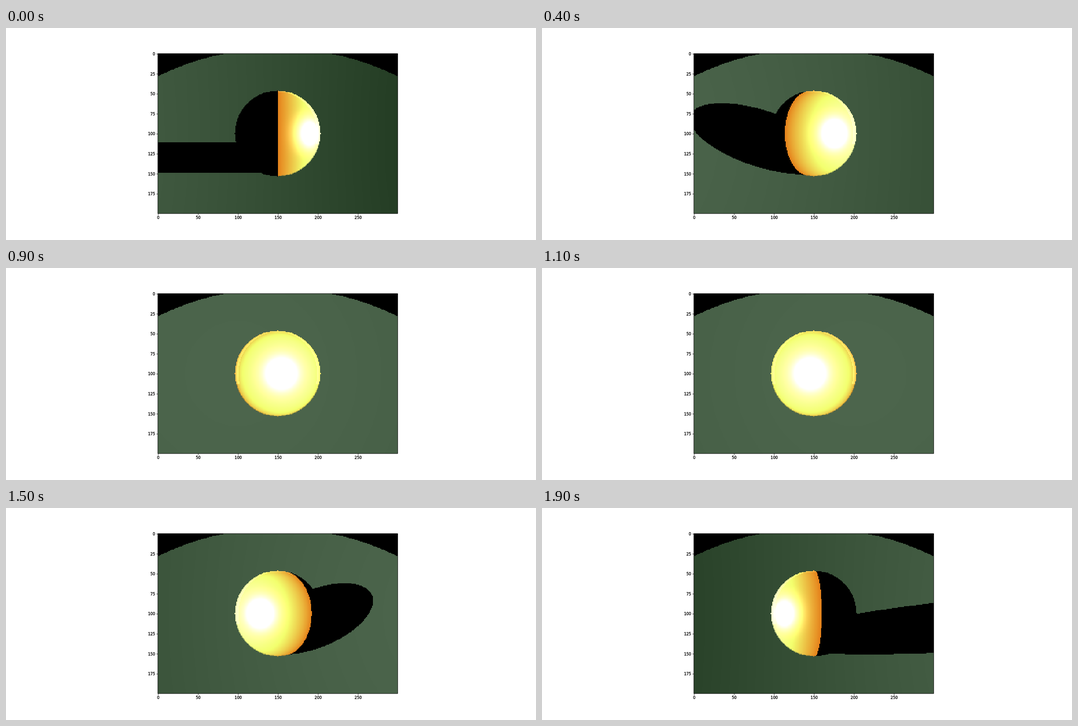
Animation, 1183 px wide and 473 px high, one loop 2 s. Source, as an HTML page with a canvas:

```html
<!DOCTYPE html>
<html lang="en">
<head>
<meta charset="utf-8">
<title>Lit ball over a disc</title>
<style>
  html, body { margin: 0; width: 100%; height: 100%; overflow: hidden; background: #fff; }
  canvas, svg { position: absolute; left: 0; top: 0; width: 1183px; height: 473px; }
  canvas { left: 338.9px; top: 57.1px; width: 535.5px; height: 357px; image-rendering: pixelated; }
  text { font: 8.33px "DejaVu Sans", sans-serif; fill: #000; stroke: #000; stroke-width: .35px; }
  path { fill: none; stroke: #000; stroke-width: .9px; }
</style>
</head>
<body>
<canvas id="view" width="300" height="200"></canvas>
<svg id="axes" viewBox="0 0 1183 473"></svg>
<script>
const W = 300, H = 200, STEPS = 20, STEP_MS = 100;
const FOCAL = 299, BALL_PX = 53.51;
const CAM = Math.hypot(1, FOCAL / BALL_PX);      // camera distance, ball radius is 1
const PLANE = 1.213;                             // ground: y + z = -PLANE
const DISC = { v: 0.625, r: 5.61 };              // ground disc, in plane coordinates

const ctx = document.getElementById('view').getContext('2d');
const image = ctx.createImageData(W, H);

const groundTone = lv => 76 * Math.pow(Math.max(0, 1 + lv) / 2, 0.58);

// Colour of the ball at ray (x, y, -1), or null when the ray misses
function ball(x, y, px, py, lx, lz) {
  const a = x * x + y * y + 1;
  const q = CAM * CAM - a * (CAM * CAM - 1);
  if (q < 0) return null;
  const t = (CAM - Math.sqrt(q)) / a;
  const nx = t * x, ny = t * y, nz = CAM - t;
  const diff = nx * lx + nz * lz;
  if (diff <= 0) return [0, 0, 0];
  const len = Math.sqrt(a);
  const hx = lx - x / len, hy = -y / len, hz = lz + 1 / len;
  const nh = (nx * hx + ny * hy + nz * hz) / Math.hypot(hx, hy, hz);
  const spec = 255 * Math.pow(Math.max(0, nh), 17);
  let c = [229 + 24 * diff + spec, 128 + 229 * diff + spec, 26 + 150 * diff + spec];
  if (py > -13) {
    const rim = Math.hypot(px / 49.5, py / 52.3) > 1;
    if (rim) c = [c[0] + 20, c[1] + 34, c[2] + 30];
  } else if (Math.hypot(px, py) > 52.7) {
    c = c.map((k, i) => Math.min(255, k) * 0.55 + [28, 40, 28][i]);
  }
  return c;
}

function ground(x, y, lx, lz) {
  const s = (CAM + PLANE) / (1 - y);
  const gx = s * x, gy = s * y, gz = CAM - s;
  const v = (gy - gz) / Math.SQRT2;
  if (Math.hypot(gx, v - DISC.v) > DISC.r) return [0, 0, 0];
  const along = gx * lx + gz * lz;
  if (along < 0 && gx * gx + gy * gy + gz * gz - along * along < 1) return [0, 0, 0];
  const tone = groundTone((lz - x * lx) / Math.sqrt(x * x + y * y + 1));
  return [tone, tone + 25, tone];
}

function render(angle) {
  const lx = Math.cos(angle), lz = Math.sin(angle), data = image.data;
  let k = 0;
  for (let j = 0; j < H; j++) {
    for (let i = 0; i < W; i++) {
      const px = i - (W - 1) / 2, py = (H - 1) / 2 - j;
      const x = px / FOCAL, y = py / FOCAL;
      const c = ball(x, y, px, py, lx, lz) || ground(x, y, lx, lz);
      data[k++] = c[0];
      data[k++] = c[1];
      data[k++] = c[2];
      data[k++] = 255;
    }
  }
  ctx.putImageData(image, 0, 0);
}

function drawAxes() {
  const x0 = 338.9, y0 = 57.1, unit = 1.785, right = x0 + W * unit, bottom = y0 + H * unit;
  let d = `M${x0} ${y0}H${right}V${bottom}H${x0}Z`, labels = '';
  const label = (x, y, anchor, n) => {
    labels += `<text x="${x}" y="${y}" text-anchor="${anchor}">${n}</text>`;
  };
  for (let n = 0; n < W; n += 50) {
    const x = x0 + (n + 0.5) * unit;
    d += `M${x} ${bottom}v3`;
    label(x, 425.9, 'middle', n);
  }
  for (let n = 0; n < H; n += 25) {
    const y = y0 + (n + 0.5) * unit;
    d += `M${x0} ${y}h-3`;
    label(332.8, y + 3, 'end', n);
  }
  document.getElementById('axes').innerHTML = `<path d="${d}"/>${labels}`;
}

const start = performance.now();
let shown = -1;

function tick() {
  const step = Math.floor((performance.now() - start) / STEP_MS) % STEPS;
  if (step !== shown) {
    shown = step;
    render(step * Math.PI / STEPS);
  }
  requestAnimationFrame(tick);
}

drawAxes();
tick();
</script>
</body>
</html>
```
